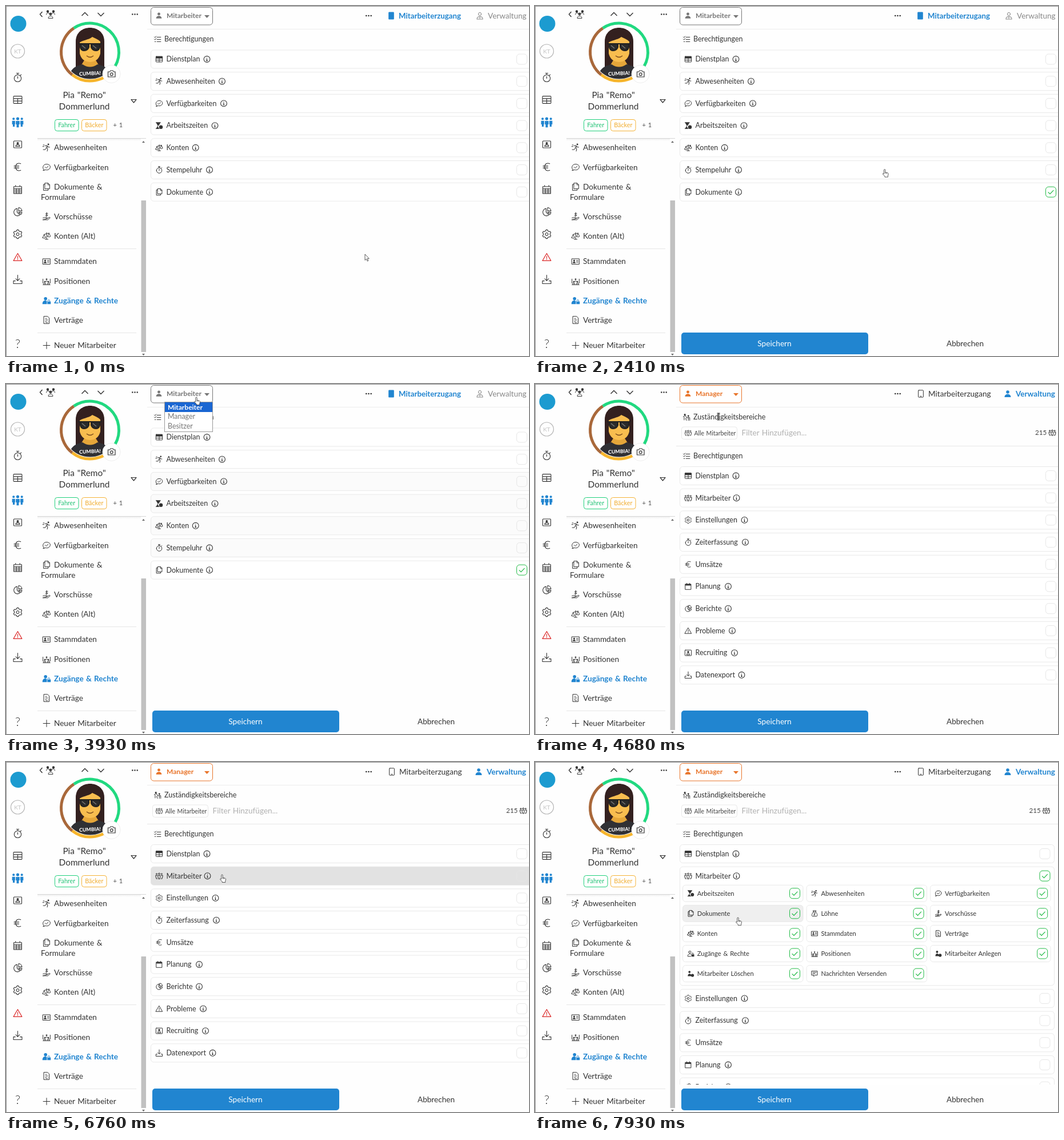
Write an HTML page that moves like this. It is 915x612 px and loops after 7.99 s.

```html
<!DOCTYPE html>
<html lang="de">
<head>
<meta charset="utf-8">
<title>Zugänge &amp; Rechte</title>
<style>
html, body { margin: 0; width: 100%; height: 100%; overflow: hidden; background: #fff; }
svg { display: block; width: 915px; height: 612px; font-family: Lato, "Open Sans", sans-serif; word-spacing: .06em; }
</style>
</head>
<body>
<svg id="stage" viewBox="0 0 915 612" xmlns="http://www.w3.org/2000/svg"></svg>
<script>
const INK = '#333', BLUE = '#2185d0', ORANGE = '#e8742a', GREEN = '#21ba45', GREY = '#767676';

// Icons live in a 16 x 16 box: [stroked path, filled path].
const dot = (x, y, r) => `M${x - r} ${y}a${r} ${r} 0 1 0 ${2 * r} 0a${r} ${r} 0 1 0 ${-2 * r} 0z`;
const cog = () => Array.from({ length: 72 }, (_, i) => {
  const a = i * Math.PI / 36;
  const r = 6.4 + Math.max(-.8, Math.min(.8, 2 * Math.cos(6 * a)));
  return `${i ? 'L' : 'M'}${(8 + r * Math.sin(a)).toFixed(2)} ${(8 - r * Math.cos(a)).toFixed(2)}`;
}).join('') + 'z';
const tableFrame = 'M2 2h12q1 0 1 1v10q0 1-1 1H2q-1 0-1-1V3q0-1 1-1zM1 10h14M8 6v8';
const ICONS = {
  watch: [dot(8, 9.3, 5.8) + 'M6 1h4M8 1v2.5M12.500 4.500l1.200-1.200M8 9.500V6.300'],
  table: [tableFrame + 'M1 6h14'],
  tableHead: [tableFrame, 'M1 2h14v4.500H1z'],
  team: ['', dot(8, 3.5, 2) + dot(2.5, 3.6, 1.6) + dot(13.5, 3.6, 1.6) +
    'M5.500 6.500h5v4.500h-1v4h-3v-4h-1zM.5 6.300h4v4.700H4v3H1.500v-3h-1zM11.500 6.300h4v4.700h-1v3H12v-3h-.5z'],
  teamLine: [dot(8, 3.5, 1.7) + dot(2.6, 3.8, 1.3) + dot(13.4, 3.8, 1.3) +
    'M5.800 7h4.400v4.500H9.500V14.500h-3v-3h-.7zM.6 7H4M.6 7v4h1v3H4M15.400 7H12M15.400 7v4h-1v3H12'],
  group: ['M4 15c0-5 8-5 8 0zM.6 9c0-3 3-4 5-2M15.400 9c0-3-3-4-5-2' + dot(8, 8, 2), dot(3, 3.5, 2.2) + dot(13, 3.5, 2.2) + dot(8, 8, 1.8)],
  contact: ['M2 2h12q1 0 1 1v10q0 1-1 1H2q-1 0-1-1V3q0-1 1-1zM4.500 11.500c0-3.800 7-3.800 7 0z', dot(8, 6, 2)],
  euro: ['M13 2.500C8 .5 4.500 3.500 4.500 8s3.500 7.500 8.500 5.500M2 6.500h8M2 9.500h8'],
  grid: ['M1.500 3h13v11.500h-13zM1.500 6.300h13M1.500 9h13M1.500 11.800h13M5.800 6.300v8M10.200 6.300v8M4.500 1v2M11.500 1v2'],
  calendar: ['M2 3h12v11.500H2zM5 1v2M11 1v2', 'M2 3h12v3H2z'],
  pie: ['M7 2.500A6 6 0 1 0 11.500 13L7 8.500zM9.500 1A6 6 0 0 1 15 6.500H9.500zM9.500 8.800H15a6 6 0 0 1-1.800 3.600z'],
  gear: [cog() + dot(8, 8, 2.3)],
  warn: ['M8 2l7 12H1zM8 6.500v3.500M8 11.600v.6'],
  download: ['M8 1v9M4.800 7L8 10.200 11.200 7M4 10.500H1V15h14v-4.500h-3'],
  bubble: ['M3 13.500C-1 9 1 2 8 2s9 6 5 9.500c-2 2-5 2-7 1.300L1.500 14zM5 7.500l2.200 2.200L11 6'],
  run: ['M5 4.500l3.500-.5 2.500 3 3 .3M9 4.500L7 8.500l3.200 2-1 4.500M6.800 9.500L5.500 12H1.500M1.500 3h2M.5 6h2.500M10.500 6L8.800 9', dot(11.4, 2, 1.6)],
  docs: ['M5 1h6l3 3v8H5zM10.500 1v3.500H14M5 3.500H2V15h9v-3'],
  coin: ['M10.300 2.200C6 .5 5.500 4 8 4.300c3.500.5 2.500 3.800-2 2.200M8 .5v7.500M1 11l3-1h4l1.500 1.500H7M9.500 11.800L14 9.500l1 1-4.500 4H1z'],
  scale: ['M3 5.200L13 2.500M8 1.500v13M5 14.500h6M.5 11.500l2.700-6.300 2.700 6.300q-2.700 2.500-5.400 0zM10.100 9l2.700-6.300L15.500 9q-2.700 2.500-5.400 0z'],
  card: ['M1 3h14v10.500H1zM9.500 6.500h3.500M9.500 9.500h3.500', dot(5.2, 6.5, 1.7) + 'M2.500 11.500c0-4 5.400-4 5.400 0z'],
  spots: ['M1 15h14M1 4v8M15 4v8M4 10l4-2.500 4 2.500M3 15v-3.500h3V15M10 15v-3.500h3V15', dot(8, 4.5, 1.6) + dot(4.5, 9, 1.3) + dot(11.5, 9, 1.3)],
  lock: ['M10.500 10V8.500a1.800 1.800 0 0 1 3.600 0V10', dot(6, 4.5, 3.1) + 'M0 15C0 7 6 7.500 8.500 9v6zM9.500 9.800H16V15H9.500z'],
  lockLine: ['M10.500 10V8.500a1.800 1.800 0 0 1 3.600 0V10M8 14.500H1C1 8 6 8 8 9.500' + dot(6, 4.5, 2.6), 'M9.500 10H16v5H9.500z'],
  contract: ['M3 1h7l3 3v11H3zM6 5h2M6 8h4M6 12q1-3 1.500 0t3 0'],
  plus: ['M8 1.500v13M1.500 8h13'],
  hourglass: ['M1 1.500h10M1 14.500h7M2.500 1.500c0 4 3 4.500 3 6.500s-3 2.500-3 6.500M9.500 1.500c0 3-1.500 4-2 5', 'M2.500 1.500h7c0 4-2.500 4-2.500 6.500L5 8c0-2-2.500-2.500-2.500-6.500zM2.500 15c0-3 2-4 3-5l2 5z' + dot(11.7, 11.2, 4)],
  checklist: ['M1 3l1.500 1.500L5 1.500M1 8l1.500 1.500L5 6.500M7 3.500h8.500M7 8.500h8.500M7 13.500h8.500M2 13.500h2'],
  bag: ['M5.500 4.500h5C15 8 15 14.500 13 14.500H3C1 14.500 1 8 5.500 4.500zL4.500 1.500h7l-1 3M10 8H7q-1.500 1.200 1 1.800 2.500.8 0 2H6'],
  note: ['M1.500 2h13v9.500H9L6 14.500v-3H1.500zM4 5.200h8M4 8.200h5'],
  add: ['', dot(5, 4, 2.6) + 'M1 14c0-7 6-7 7.500-4v4z' + dot(12, 12, 3.6)],
  person: ['', dot(8, 4.5, 3.3) + 'M1.500 15c0-8 13-8 13 0z'],
  personLine: [dot(8, 4.5, 3) + 'M2 15c0-7 12-7 12 0zM8 10v3.500'],
  areas: ['M6 5l2.500 4-2 2M3 8v6M6.500 11L8 15M9 9h6v6M12 9v6M1 7l4-2', dot(4.5, 2.5, 2) + dot(12, 5.5, 1.8)],
  phone: ['M4 1h8q1 0 1 1v12q0 1-1 1H4q-1 0-1-1V2q0-1 1-1zM7 13h2'],
  phoneFull: ['', 'M4 .5h8q1.500 0 1.500 1.500v12q0 1.500-1.500 1.500H4q-1.500 0-1.500-1.500V2Q2.500.5 4 .5z']
};

const icon = (name, cx, cy, size = 13, color = INK, weight = 1) => {
  const [line, solid = ''] = ICONS[name];
  const k = size / 16;
  return `<g transform="translate(${cx - size / 2} ${cy - size / 2}) scale(${k})" stroke-linejoin="round" stroke-linecap="round">
    <path d="${solid}" fill="${color}"/><path d="${line}" fill="none" stroke="${color}" stroke-width="${weight / k}"/></g>`;
};
const text = (x, y, s, size = 12.5, fill = INK, weight = 400, anchor = 'start') =>
  `<text x="${x}" y="${y}" font-size="${size}" fill="${fill}" font-weight="${weight}" text-anchor="${anchor}">${s.replace('&', '&amp;')}</text>`;
const box = (x, y, w, h, rx, fill, stroke = 'none', extra = '') =>
  `<rect x="${x}" y="${y}" width="${w}" height="${h}" rx="${rx}" fill="${fill}" stroke="${stroke}" ${extra}/>`;
const path = (d, stroke = INK, width = 1.2, fill = 'none', extra = '') =>
  `<path d="${d}" stroke="${stroke}" stroke-width="${width}" fill="${fill}" ${extra}/>`;
const rule = (x1, x2, y, color = '#e6e6e6') => path(`M${x1} ${y}H${x2}`, color, 1);
const dots = (cx, cy) => path([-4.2, 0, 4.2].map(d => dot(cx + d, cy, 1.3)).join(''), 'none', 0, INK);
const info = (cx, cy) => path(dot(cx, cy, 5.4), INK, 1.1) + path(`M${cx - 1} ${cy - .5}h1v3M${cx - 1.5} ${cy + 2.6}h3M${cx - .4} ${cy - 2.8}h.9`, INK, 1.1);
const tick = (cx, cy) => box(cx - 9, cy - 9, 18, 18, 5, 'none', GREEN) +
  path(`M${cx - 4.8} ${cy + .2}l3.300 3.300 6.300-6.600`, GREEN, 1.2);

function row(view, cy, name, label, infoX) {
  const rect = (fill, stroke, cls, more = '') => box(253.5, cy - 16, 680, 32, 5, fill, stroke, `class="wide ${cls}" ${more}`);
  return `<g id="${view}${label}">${rect('#fff', '#e9e9e9', '')}${rect('#e2e2e2', 'none', 'hover', 'opacity="0"')}
    ${icon(name, 268, cy)}${text(280.5, cy + 4.3, label)}${infoX ? info(infoX, cy) : ''}
    <g class="end">${box(893.5, cy - 9, 18, 18, 5, 'none', '#e6e6e6')}<g class="tick" display="none">${box(893, cy - 10, 20, 20, 5, '#fff')}${tick(902.5, cy)}</g></g></g>`;
}

function cell(i, [name, label]) {
  const x = 258.5 + i % 3 * 216.6, cy = 229.7 + Math.floor(i / 3) * 35.1;
  return `<g id="cell${i}">${box(x, cy - 14.5, 210.5, 29, 5, '#fff', '#e9e9e9')}
    ${box(x, cy - 14.5, 210.5, 29, 5, '#e2e2e2', 'none', 'class="hover" opacity="0"')}
    ${icon(name, x + 14, cy, 12)}${text(x + 25.3, cy + 4, label, 11.15)}${tick(x + 196, cy)}</g>`;
}

function arc(from, to, color) {
  const at = a => `${147 + 50.5 * Math.cos(a * Math.PI / 180)} ${80.5 + 50.5 * Math.sin(a * Math.PI / 180)}`;
  return path(`M${at(from)}A50.5 50.5 0 ${to - from > 180 ? 1 : 0} 1 ${at(to)}`, color, 5);
}

const portrait = () => `<clipPath id="round"><circle cx="147" cy="80.5" r="47"/></clipPath><g clip-path="url(#round)">
  ${path('M122 106V62c0-32 50-32 50 0v44z', 'none', 0, '#33201f')}
  ${path('M140 90h14l8 13q-15 10-30 0z', 'none', 0, '#e5a63a')}
  ${path('M129 60q18-16 36 0v23q-3 14-18 15-15-1-18-15z', 'none', 0, '#f8bd4f')}
  ${path('M126 66c0-27 42-27 42 0-5-8-12-9-17-12-7 6-18 5-25 12z', 'none', 0, '#33201f')}
  ${path('M126 66h42M130 66h15v6q-2 6-8 6-6 0-7-6zM149 66h15v6q-1 6-7 6-6 0-8-6z', '#222', 2, '#2a2a2a')}
  ${path('M133 69l6 5M152 69l6 5', '#777', 1.5)}
  ${path('M141 87q6 5 12 0', '#7a4a1c', 1.4)}
  ${path('M108 130c4-20 12-25 26-28q13 9 26 0c14 3 23 8 27 28z', 'none', 0, '#303034')}
  <text x="147" y="121" font-size="8.8" font-weight="800" fill="#fff" text-anchor="middle" transform="rotate(-3 147 118)">CUMBIA!</text></g>`;

function sidebar() {
  const nav = [['watch', 125], ['table', 164], ['team', 203, BLUE, 21], ['contact', 242, INK, 16], ['euro', 281.5], ['grid', 321],
    ['pie', 360], ['gear', 399], ['warn', 439, '#db2828'], ['download', 478]];
  const menu = [['run', 247.5, 'Abwesenheiten'], ['bubble', 282, 'Verfügbarkeiten'], ['docs', 316, 'Dokumente &'], ['coin', 368, 'Vorschüsse'],
    ['scale', 402, 'Konten (Alt)'], ['card', 446.5, 'Stammdaten'], ['spots', 481, 'Positionen'], ['lock', 515, 'Zugänge & Rechte', BLUE],
    ['contract', 549, 'Verträge'], ['plus', 593.5, 'Neuer Mitarbeiter']];
  return `<circle cx="21.500" cy="31" r="14" fill="#1c9bd0"/>` +
    path(dot(20.5, 79, 12), '#b5b5b5') + text(20.5, 82.5, 'KT', 10, '#c4c4c4', 400, 'middle') +
    nav.map(([n, y, c = INK, s = 17]) => icon(n, 20.5, y, s, c, 1.1)).join('') +
    text(20.5, 598, '?', 21, INK, 300, 'middle') +
    path('M63.500 10l-4 4.500 4 4.500M132.500 17l5.500-5.500 5.500 5.500M160.500 12l5.500 5.500 5.500-5.500', INK, 1.4) +
    icon('group', 78, 14, 16) + dots(225.5, 14.5) + portrait() +
    arc(30, 128, '#f7b52c') + arc(128, 236, '#a9683a') + arc(-124, 30, '#21d980') +
    path(dot(184.5, 119, 15.5), '#eee', 1, '#fff') +
    path('M178.500 115h3l1.500-2h4l1.500 2h2.500v9h-12.500z' + dot(184.7, 119.3, 2.4), INK, 1.2) +
    text(137, 160.5, 'Pia "Remo"', 15.4, INK, 400, 'middle') + text(137, 180.5, 'Dommerlund', 15.4, INK, 400, 'middle') +
    path('M219 163.500h9l-4.500 5.500z', INK, 1.2, 'none', 'stroke-linejoin="round"') +
    box(85.5, 198.5, 41.5, 20, 4, '#fff', '#21d07c') + text(106.2, 212, 'Fahrer', 10.7, '#21c274', 400, 'middle') +
    box(132.5, 198.5, 43.5, 20, 4, '#fff', '#f5b338') + text(154.3, 212, 'Bäcker', 10.8, '#f0ab2d', 400, 'middle') +
    text(187.5, 212, '+ 1', 11, '#555') +
    box(55, 232, 181, 4, 0, 'url(#shade)') + rule(55, 245, 231.5, '#d6d6d6') +
    menu.map(([n, y, s, c = INK]) => icon(n, 71, y, 14.5, c) + text(84, y + 4.7, s, 13.6, c, c === BLUE ? 700 : 400)).join('') +
    text(61, 338.5, 'Formulare', 13.6) + rule(55, 228, 424.5) + rule(55, 228, 571.5) +
    box(236.5, 340, 8.5, 265, 0, '#c1c1c1') + path('M238 239h5l-2.500-3zM238 608h5l-2.500 3z', 'none', 0, '#666');
}

function header(accent, label, phone, phoneX, first, last, lastX, lastIcon) {
  const bold = color => color === BLUE ? 700 : 400;
  return box(253.5, 2.5, 108, 30.5, 5, '#fff', accent) + icon('person', 267.5, 16.5, 12, accent) +
    text(281, 21, label, 12, accent, 700) + path('M347 16h9l-4.500 5z', 'none', 0, accent) +
    icon(phone, phoneX, 17, 14, first) + text(phoneX + 13, 22, 'Mitarbeiterzugang', first === BLUE ? 13.25 : 13.6, first, bold(first)) +
    icon(lastIcon, lastX - 14, 17, 13.5, last) + text(lastX, 22, 'Verwaltung', 13.5, last, bold(last));
}
const heading = y => icon('checklist', 265, y, 12.5) + text(277, y + 4.3, 'Berechtigungen');

const staffRows = [['tableHead', 'Dienstplan', 351.5], ['run', 'Abwesenheiten', 378], ['bubble', 'Verfügbarkeiten', 381], ['hourglass', 'Arbeitszeiten', 365.5],
  ['scale', 'Konten', 331.7], ['watch', 'Stempeluhr', 356], ['docs', 'Dokumente', 356]];
const leadRows = [['tableHead', 'Dienstplan', 351.5], ['teamLine', 'Mitarbeiter', 352.5], ['gear', 'Einstellungen', 366.5], ['watch', 'Zeiterfassung', 368],
  ['euro', 'Umsätze'], ['calendar', 'Planung', 338], ['pie', 'Berichte', 338], ['warn', 'Probleme', 345], ['contact', 'Recruiting', 349], ['download', 'Datenexport', 361.5]];
const cells = [['hourglass', 'Arbeitszeiten'], ['run', 'Abwesenheiten'], ['bubble', 'Verfügbarkeiten'], ['docs', 'Dokumente'], ['bag', 'Löhne'], ['coin', 'Vorschüsse'],
  ['scale', 'Konten'], ['card', 'Stammdaten'], ['contract', 'Verträge'], ['lockLine', 'Zugänge & Rechte'], ['spots', 'Positionen'], ['add', 'Mitarbeiter Anlegen'],
  ['add', 'Mitarbeiter Löschen'], ['note', 'Nachrichten Versenden']];
const lead = ([n, s, x], i) => row('lead', 160.5 + i * 38.7, n, s, x);

const stage = document.getElementById('stage');
stage.innerHTML = `
  <defs><linearGradient id="shade" x2="0" y2="1"><stop stop-color="#eee"/><stop offset="1" stop-color="#fff"/></linearGradient>
  <clipPath id="fold"><rect id="foldRect" x="250" y="183" width="665" height="0"/></clipPath></defs>
  ${box(0, 0, 915, 612, 0, '#fefefe')}${sidebar()}
  <g id="staff">${header(GREY, 'Mitarbeiter', 'phoneFull', 674, BLUE, '#888', 843, 'personLine')}
    ${heading(58)}${staffRows.map(([n, s, x], i) => row('staff', 93 + i * 38.7, n, s, x)).join('')}</g>
  <g id="lead">${header(ORANGE, 'Manager', 'phone', 675, INK, BLUE, 841, 'person')}
    ${icon('areas', 265, 58, 13)}${text(277, 62.3, 'Zuständigkeitsbereiche')}
    ${box(256.5, 75, 97, 21.5, 4, '#fff', '#e8e8e8')}${icon('teamLine', 268, 85.5, 12, '#555')}${text(278.5, 89.5, 'Alle Mitarbeiter', 10.45, '#444')}
    ${text(361.5, 90, 'Filter Hinzufügen...', 13.6, '#b0b0b0')}
    <g class="end">${text(875, 89.3, '215', 11.6, '#444')}${icon('teamLine', 905, 85, 12.5)}</g>
    ${rule(247, 915, 108.5)}${heading(126)}${leadRows.slice(0, 2).map(lead).join('')}
    <g clip-path="url(#fold)">${cells.map((c, i) => cell(i, c)).join('')}</g>
    <g id="lower">${leadRows.slice(2).map((r, i) => lead(r, i + 2)).join('')}</g></g>
  ${rule(247, 915, 40.5, '#ececec')}${dots(634.5, 17)}
  <g id="footer">${box(247, 564, 668, 48, 0, '#fefefe')}${box(256, 571, 327, 38, 5, BLUE)}
    ${text(419, 594.5, 'Speichern', 13.7, '#fff', 400, 'middle')}${text(752.5, 594.5, 'Abbrechen', 13.6, INK, 400, 'middle')}</g>
  <g id="list">${box(277.5, 31.5, 84, 52, 0, '#fff', '#999')}${box(278, 32, 83, 17, 0, '#1a66d2', 'none', 'id="choice"')}
    ${['Mitarbeiter', 'Manager', 'Besitzer'].map((s, i) => text(283, 44.5 + i * 16.8, s, i ? 12.4 : 12, GREY, i ? 400 : 700)).join('')}</g>
  ${path('M0 .5H915M.5 0V612', '#909090', 1)}
  <g id="cursor">${path('M0 0V10.500L2.500 8.300 4.200 12.200 5.900 11.400 4.200 7.700H7.300z', '#333', .8, '#fff', 'id="arrow"')}
    ${path('M-1.200 8V1.200a1.200 1.200 0 0 1 2.400 0V5.200L5.500 6.300q1.200.5 1 1.800L5.700 11.500V13.500H.3V12L-3.300 8.500q-.3-1.500 1-1.200zM1.200 5v2.500M3.300 5.800v2', '#333', .8, '#fff', 'id="hand"')}
    ${path('M-2.500-6H-.7L0-5.500.7-6H2.500M0-5.500V5.500M-2.500 6H-.7L0 5.500.7 6H2.500', '#222', 1.1, 'none', 'id="beam"')}</g>`;

const $ = id => document.getElementById(id);
const show = (el, on) => el.setAttribute('display', on ? 'inline' : 'none');
const ramp = (t, from, length) => Math.max(0, Math.min(1, (t - from) / length));
const options = [...$('list').querySelectorAll('text')];

// [time, x, y, eased]
const track = [[0, 628, 434], [610, 628, 434], [1360, 621, 313, 1], [2350, 621, 313], [2410, 612, 286], [2700, 515, 165], [2980, 400, 50],
  [3120, 346, 12], [3190, 336, 16], [3870, 336, 16], [3930, 333, 23], [4370, 321, 55], [4620, 321, 55], [4680, 321, 57],
  [5110, 321, 57], [5940, 368, 110, 1], [6760, 378, 197, 1], [7450, 378, 197], [7510, 376, 202], [7930, 355, 272], [7990, 355, 272]];

// [element, enter, leave]
const hovers = [['staffDokumente', 1160, 1480], ['staffStempeluhr', 2410, 2460], ['staffKonten', 2460, 2550], ['staffArbeitszeiten', 2550, 2640],
  ['staffVerfügbarkeiten', 2640, 2730], ['staffAbwesenheiten', 2730, 2820], ['staffDienstplan', 2820, 2900],
  ['leadDienstplan', 6325, 6520], ['leadMitarbeiter', 6560, 6960], ['cell0', 7600, 7765], ['cell3', 7830, 9000]];
const tinted = /^staff(Stempel|Konten|Arbeits|Verf)/;

function pointer(t) {
  const i = track.findIndex(k => k[0] > t);
  const [t0, x0, y0] = track[i - 1], [t1, x1, y1, eased] = track[i];
  let p = (t - t0) / (t1 - t0);
  if (eased) p = p * p * (3 - 2 * p);
  return [x0 + (x1 - x0) * p, y0 + (y1 - y0) * p];
}

function pointerKind(t, y) {
  if (t < 4680) return y > 341 || (y > 33 && y < 77) ? 'arrow' : 'hand';
  return y < 66 ? 'beam' : y < 144 ? 'arrow' : 'hand';
}

function render(t) {
  const manager = t >= 4680;
  show($('staff'), !manager);
  show($('lead'), manager);
  show($('staffDokumente').querySelector('.tick'), t >= 1480);
  show($('leadMitarbeiter').querySelector('.tick'), t >= 6960);
  $('footer').setAttribute('opacity', ramp(t, 1440, 300));

  const [x, y] = pointer(t), kind = pointerKind(t, y);
  $('cursor').setAttribute('transform', `translate(${x.toFixed(1)} ${y.toFixed(1)})`);
  for (const id of ['arrow', 'hand', 'beam']) show($(id), id === kind);

  const active = t > 3900 && y > 48 ? 1 : 0;
  show($('list'), t >= 3250 && !manager);
  $('choice').setAttribute('y', 32 + active * 17);
  options.forEach((o, i) => o.setAttribute('fill', i === active ? '#fff' : GREY));

  for (const [id, enter, leave] of hovers) {
    const level = ramp(t, enter, 180) - ramp(t, leave, 180);
    const floor = tinted.test(id) && t > leave ? .15 : 0;
    $(id).querySelector('.hover').setAttribute('opacity', Math.max(level, floor));
  }

  const open = ramp(t, 6910, 290), grow = 175.5 * open * (2 - open), narrow = t >= 7020;
  $('lower').setAttribute('transform', `translate(0 ${grow})`);
  $('foldRect').setAttribute('height', open ? 32 + grow : 0);
  $('leadMitarbeiter').querySelectorAll('.wide').forEach(r => r.setAttribute('height', 32 + grow));
  $('lead').querySelectorAll('.wide').forEach(r => r.setAttribute('width', narrow ? 655 : 680));
  $('lead').querySelectorAll('.end').forEach(g => g.setAttribute('transform', `translate(${narrow ? -10.5 : 0} 0)`));
}

function frame() {
  render(performance.now() % 7990);
  requestAnimationFrame(frame);
}
frame();
</script>
</body>
</html>
```
